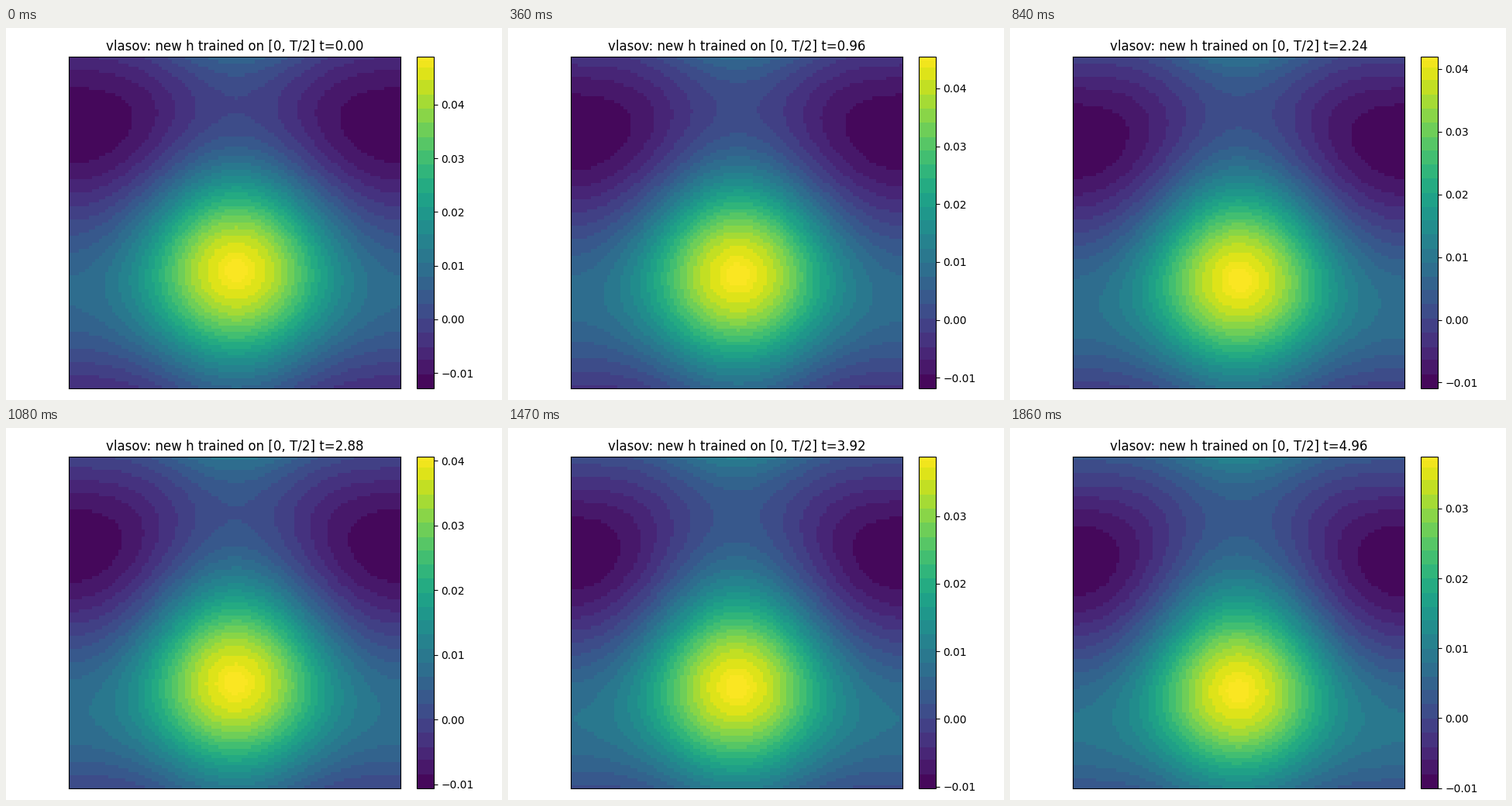
A matplotlib script that plays this animation: 640 by 480 pixels, repeating every 1.89 s.

```python
import numpy as np
import matplotlib.pyplot as plt
from matplotlib.animation import FuncAnimation
from matplotlib.colors import ListedColormap
from matplotlib.ticker import MultipleLocator

W, H, DPI = 640, 480, 100
FRAMES, INTERVAL, DT = 63, 30, 0.08
LEFT, TOP, SIZE, CELLS = 81.2, 37.15, 428, 100

plt.rcParams["font.family"] = "DejaVu Sans"


def banded_viridis():
    """Viridis reduced to flat steps, with two narrow ones at the top."""
    edges = np.append(10.8 * np.arange(24), [253, 256]).round().astype(int)
    base = plt.get_cmap("viridis")(np.arange(256))
    steps = [np.tile(base[a:b].mean(axis=0), (b - a, 1))
             for a, b in zip(edges[:-1], edges[1:])]
    return ListedColormap(np.vstack(steps))


def relax(start, change, rate, t):
    return start + change * (1 - np.exp(-rate * t))


def limits(t):
    return relax(-0.0129, 0.0033, 0.4, t), relax(0.0489, -0.0162, 0.25, t)


pos = (np.arange(CELLS) + 0.5) * SIZE / CELLS
X, Y = np.meshgrid(LEFT + pos, TOP + pos)


def angle(p, p0):
    return 2 * np.pi * (p - p0) / SIZE


def field(t):
    low, peak = limits(t)
    saddle = relax(0, 0.008, 0.12, t)
    side = 0.0083

    theta = angle(X, 297.4 - 0.5 * t)
    phi = angle(Y, 313.5 + 5.3 * t)
    psi = angle(Y, 126 + 9.2 * t)
    mix = (1 + np.cos(theta)) / 2

    # Column through the peak: sharpened, and steeper below than above
    inner = (peak + saddle) / 2 + (peak - saddle) / 2 * np.cos(phi)
    inner -= 0.0034 * np.sin(phi) ** 2
    inner -= 0.00015 * t * np.sin(phi) * (1 - np.cos(phi))

    # Column through the two dark wells at the sides
    outer = (side + low) / 2 - (side - low) / 2 * np.cos(psi)

    pinch = 0.0032 + 0.0014 * np.cos(phi) - 0.0001 * t
    return mix * inner + (1 - mix) * outer - pinch * np.sin(theta) ** 2


def add_axes(x, y, w, h):
    return fig.add_axes([x / W, 1 - (y + h) / H, w / W, h / H])


fig = plt.figure(figsize=(W / DPI, H / DPI), dpi=DPI, facecolor="white")
ax = add_axes(LEFT, TOP, SIZE, SIZE)
cax = add_axes(530.1, TOP, 21.8, SIZE)

img = ax.imshow(field(0), cmap=banded_viridis(), interpolation="nearest",
                aspect="auto")
img.set_clim(*limits(0))
ax.set_xticks([])
ax.set_yticks([])
title = ax.set_title("", fontsize=12)
fig.colorbar(img, cax=cax, ticks=MultipleLocator(0.01))


def update(i):
    t = i * DT
    img.set_data(field(t))
    img.set_clim(*limits(t))
    title.set_text(f"vlasov: new h trained on [0, T/2] t={t:.2f}")
    return img, title


anim = FuncAnimation(fig, update, frames=FRAMES, interval=INTERVAL,
                     repeat=True, repeat_delay=0, blit=False)
plt.show()
```
